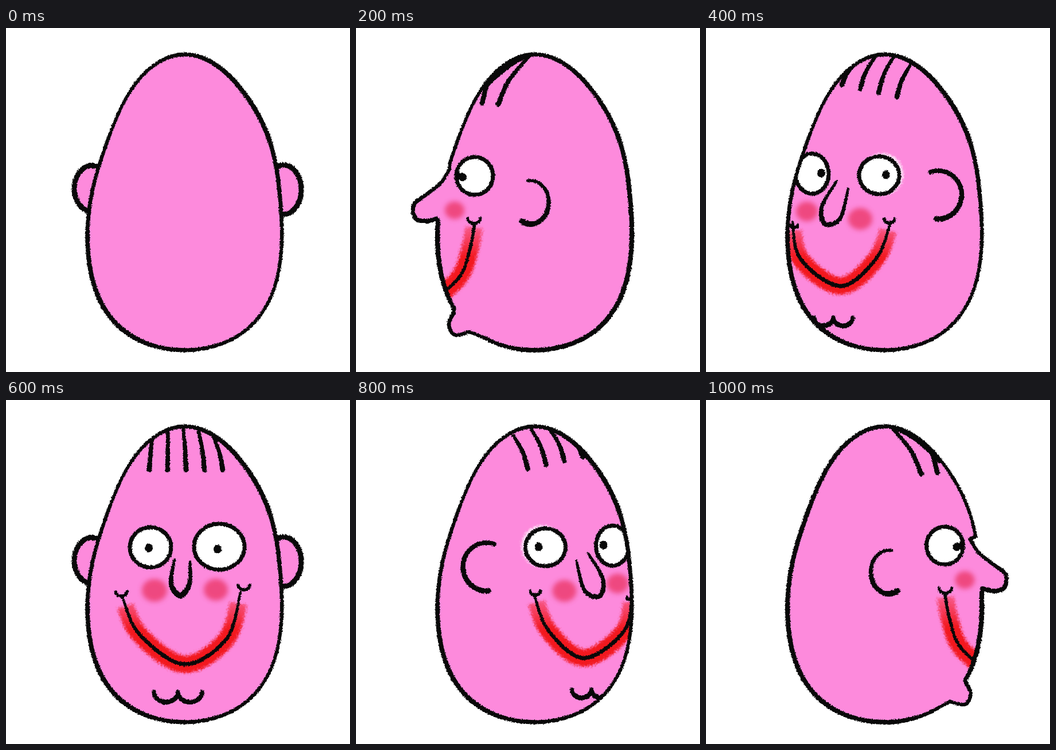
Recreate the animation shown at these times as an HTML page. Size 600 px wide and 600 px high, loop 1.2 s.

```html
<!DOCTYPE html>
<html lang="en">
<head>
<meta charset="utf-8">
<title>Turning egg head</title>
<style>
  html, body { margin: 0; width: 100%; height: 100%; overflow: hidden; background: #fff; }
  svg { display: block; width: 100vw; height: 100vh; }
</style>
</head>
<body>
<svg id="stage" viewBox="0 0 600 600">
  <defs>
    <filter id="rough" filterUnits="userSpaceOnUse" x="0" y="0" width="600" height="600" color-interpolation-filters="sRGB">
      <feTurbulence type="fractalNoise" baseFrequency=".4" numOctaves="2" seed="4"/>
      <feDisplacementMap in="SourceGraphic" scale="4" xChannelSelector="R" yChannelSelector="G"/>
    </filter>
    <filter id="chalk" filterUnits="userSpaceOnUse" x="0" y="0" width="600" height="600" color-interpolation-filters="sRGB">
      <feGaussianBlur in="SourceGraphic" stdDeviation="2" result="soft"/>
      <feTurbulence type="fractalNoise" baseFrequency=".3" numOctaves="2" seed="9"/>
      <feDisplacementMap in="soft" scale="8" xChannelSelector="R" yChannelSelector="G"/>
    </filter>
    <filter id="blush" x="-50%" y="-50%" width="200%" height="200%">
      <feGaussianBlur stdDeviation="4"/>
    </filter>
    <linearGradient id="lipstick" gradientUnits="userSpaceOnUse" x1="0" y1="345" x2="0" y2="400">
      <stop offset="0" stop-color="#f2181e" stop-opacity=".4"/>
      <stop offset="1" stop-color="#f2181e"/>
    </linearGradient>
  </defs>
</svg>
<script>
const HOLD = 200;
const INK = '#090909', SKIN = '#fd8adc', BLUSH = '#ec3d70';
const LEFT = -1, RIGHT = 1;
const TOP = 46, HEIGHT = 516;
const stage = document.getElementById('stage');

// Sample f(u) for u from 0 to 1.
const sample = (f, n = 40) => Array.from({ length: n + 1 }, (_, i) => f(i / n));

// Smooth line through a few key points.
function curve(...xy) {
  const p = [];
  for (let i = 0; i < xy.length; i += 2) p.push([xy[i], xy[i + 1]]);
  const last = p.length - 1;
  return sample(u => {
    const i = Math.min(Math.floor(u * last), last - 1), t = u * last - i;
    const b = p[i], c = p[i + 1], a = p[i - 1] || b, d = p[i + 2] || c;
    return [0, 1].map(k => b[k] + t / 2 * (c[k] - a[k]
      + t * (2 * a[k] - 5 * b[k] + 4 * c[k] - d[k]
      + t * (3 * (b[k] - c[k]) + d[k] - a[k]))));
  });
}

// Part of an ellipse, angles in degrees, clockwise from the right.
const arc = (x, y, rx, ry, from, to) => sample(u => {
  const a = (from + (to - from) * u) * Math.PI / 180;
  return [x + rx * Math.cos(a), y + ry * Math.sin(a)];
});

// Edge of the egg: a runs from 0 at the top to PI at the bottom.
function edge(a, side) {
  const c = Math.cos(a);
  const lean = 7 * Math.exp(-(((c - .45) / .35) ** 2));
  const half = (166 - 31 * c + 18 * c ** 2 - 10 * c ** 3) * Math.sin(a);
  return [311.5 + lean + side * half, TOP + HEIGHT * (1 - c) / 2];
}
const angleAt = y => Math.acos(1 - 2 * (y - TOP) / HEIGHT);
const along = (y0, y1, side) => {
  const a = angleAt(y0), b = angleAt(y1);
  return sample(u => edge(a + (b - a) * u, side));
};

const BOTTOM = TOP + HEIGHT;
const egg = [...along(TOP, BOTTOM, LEFT), ...along(BOTTOM, TOP, RIGHT)];

// The profile is drawn facing left; facing right it is flipped.
const FLIP_X = 623.5, FLIP_Y = -4;
function profileHead(side) {
  const turn = p => side === LEFT ? p : p.map(([x, y]) => [FLIP_X - x, y + FLIP_Y]);
  return [
    ...along(TOP, 238, side),
    ...turn(curve(163, 246, 148, 270, 122, 291, 101, 308, 103, 331, 120, 337, 141, 333)),
    ...along(338, 488, side),
    ...turn(curve(170, 497, 162, 517, 172, 535, 198, 530)),
    ...along(541, BOTTOM, side),
    ...along(BOTTOM, TOP, -side)
  ];
}

const pathOf = pts => 'M' + pts.map(p => p[0].toFixed(1) + ' ' + p[1].toFixed(1)).join('L');

// Brush line; width is a number or a function of the progress along the line.
function ink(pts, width) {
  const w = typeof width === 'function' ? width : () => width;
  const lines = pts.slice(1).map((p, i) =>
    `<path d="${pathOf([pts[i], p])}" stroke-width="${w((i + .5) / (pts.length - 1)).toFixed(1)}"/>`);
  return `<g fill="none" stroke="${INK}" stroke-linecap="round">${lines.join('')}</g>`;
}
const grow = (from, to) => u => from + (to - from) * u;
const swell = (ends, middle) => u => ends + (middle - ends) * Math.sin(Math.PI * u);

const oval = (x, y, rx, ry, more) => `<ellipse cx="${x}" cy="${y}" rx="${rx}" ry="${ry}" ${more}/>`;
const rough = s => `<g filter="url(#rough)">${s}</g>`;
const cheek = (x, y, r) => oval(x, y, r, r * .9, `fill="${BLUSH}" opacity=".85" filter="url(#blush)"`);
const eye = (x, y, rx, ry, px, py) =>
  oval(x, y, rx, ry, `fill="#fff" stroke="${INK}" stroke-width="7"`) + oval(px, py, 7, 7.5, `fill="${INK}"`);
const glow = (x, y, r) => oval(x, y, r, r, 'fill="#fff" opacity=".8" filter="url(#chalk)"');
const dimple = (x, y, r) => ink(arc(x, y, r, r * .8, 0, 180), 5);
const chin = (x, y, r) => [-r, r].map(d => ink(arc(x + d, y, r, r * .85, 180, 0), swell(7, 8))).join('');
const sideEar = (x, y, rx, ry) => oval(x, y, rx, ry, `fill="${SKIN}" stroke="${INK}" stroke-width="9"`);

const lips = pts => `<g filter="url(#chalk)"><path d="${pathOf(pts.slice(3, -3))}" fill="none" stroke="url(#lipstick)" stroke-width="30"/></g>`;

// Evenly spread strands from the crown down to the forehead.
function hair(count, root, rootStep, tip, tipStep, y, yStep) {
  let s = '';
  for (let i = 0; i < count; i++) {
    const x0 = root + rootStep * i, x1 = tip + tipStep * i;
    const y0 = TOP + 2 + (x0 - 307) ** 2 / 190, y1 = y + yStep * i;
    s += ink(curve(x0, y0, x0 + (x1 - x0) * .65, (y0 + y1) / 2, x1, y1), grow(5.5, 8.5));
  }
  return s;
}

// Thick lock that hugs the crown.
const lock = (side, width) =>
  ink(along(48, 106, side).map(([x, y]) => [x - side * 3, y + 2]), swell(5, width));

function profile() {
  const mouth = curve(207, 341, 199, 384, 182, 432, 140, 472);
  return lips(mouth) + cheek(172, 318, 17) + rough(
    hair(2, 245, 58, 220, 28, 131, 2) +
    eye(207, 258, 32, 33, 186, 260) + ink(curve(178, 253, 180, 262), 6) +
    dimple(206, 332, 11) + ink(mouth, 5.5) +
    ink(arc(305, 304, 31, 38, -100, 120), grow(5, 10)));
}

function threeQuarter() {
  const mouth = curve(151, 338, 165, 403, 235, 450, 297, 402, 322, 338);
  return lips(mouth) + cheek(176, 320, 19) + cheek(269, 333, 21) + glow(308, 255, 36) + rough(
    hair(4, 265, 31, 237, 32, 99, 7) +
    eye(185, 254, 29, 35, 201, 253) + eye(302, 257, 35, 33, 314, 256) +
    ink(curve(228, 267, 202, 312, 208, 342, 234, 332, 248, 280), swell(4, 8)) +
    ink(mouth, swell(4, 7)) + dimple(154, 344, 6) + dimple(320, 333, 9) +
    chin(222, 505, 17) +
    ink(arc(405, 291, 41, 42, -110, 95), grow(7.5, 9)));
}

function front() {
  const mouth = curve(203, 344, 233, 409, 311, 461, 385, 416, 409, 335);
  return lips(mouth) + cheek(259, 332, 22) + cheek(366, 331, 21) + rough(
    hair(5, 256, 26.5, 250, 32, 122, 0) +
    eye(252, 257, 36, 35, 249, 258) + eye(372, 256, 44, 40, 369, 260) +
    ink(curve(294, 278, 288, 320, 304, 341, 320, 320, 321, 282), swell(4, 10)) +
    ink(mouth, swell(4, 7)) + dimple(201, 334, 10) + dimple(415, 323, 10) +
    chin(300, 509, 21));
}

const mirror = (s, x, y) => `<g transform="translate(${x} ${y}) scale(-1 1)">${s}</g>`;
const ears = sideEar(150, 280, 31, 40) + sideEar(484, 282, 31, 43);

const poses = [
  { head: egg, back: ears },
  { head: profileHead(LEFT), face: profile(), extra: lock(LEFT, 13) },
  { head: egg, face: threeQuarter() },
  { head: egg, face: front(), back: ears },
  { head: egg, face: mirror(threeQuarter(), 632.5, 0) },
  { head: profileHead(RIGHT), face: mirror(profile(), FLIP_X, FLIP_Y), extra: lock(RIGHT, 8) }
];

const outline = u => 7 + 1.2 * Math.cos(4 * Math.PI * (u - .38));

function draw({ head, face = '', back = '', extra = '' }, i) {
  const d = pathOf(head) + 'Z';
  return `<g class="pose" display="none">
    <clipPath id="clip${i}"><path d="${d}"/></clipPath>
    ${rough(back)}
    <path d="${d}" fill="${SKIN}"/>
    <g clip-path="url(#clip${i})">${face}</g>
    ${rough(ink(head, outline) + extra)}
  </g>`;
}

stage.insertAdjacentHTML('beforeend', poses.map(draw).join(''));
const views = [...stage.querySelectorAll('.pose')];
let shown = -1;

function render(ms) {
  const now = Math.floor(ms / HOLD) % views.length;
  if (now === shown) return;
  views.forEach((v, i) => v.setAttribute('display', i === now ? 'inline' : 'none'));
  shown = now;
}

const start = performance.now();
function tick() {
  render(performance.now() - start);
  requestAnimationFrame(tick);
}
tick();
</script>
</body>
</html>
```
